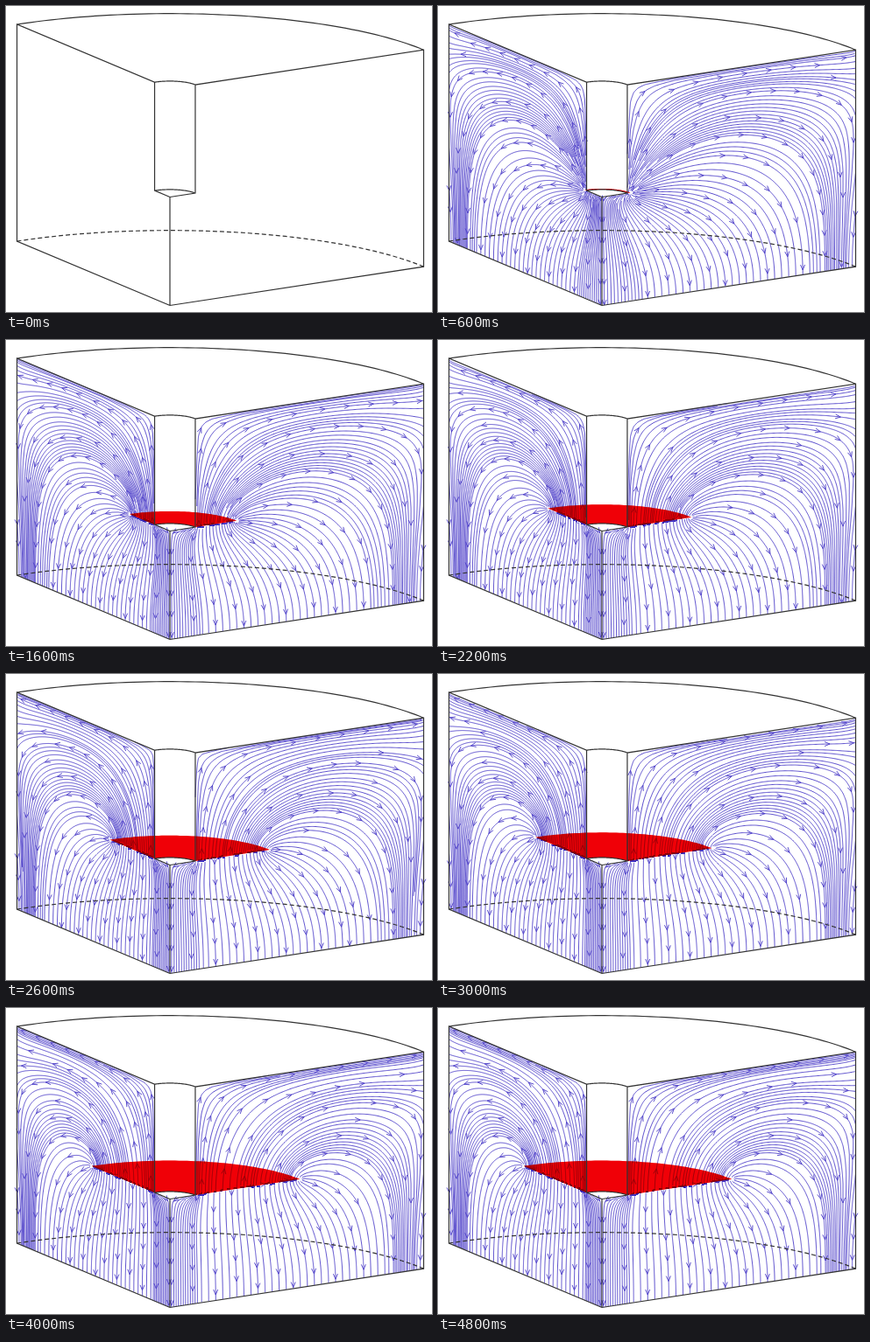
These frames come from a looping animation (486x350 px, 5000 ms). An HTML page with a canvas:

```html
<!DOCTYPE html>
<html lang="en">
<head>
<meta charset="utf-8">
<title>Flow around a growing crack</title>
<style>
  html, body { margin: 0; width: 100%; height: 100%; overflow: hidden; background: #fff; }
  canvas { display: block; }
</style>
</head>
<body>
<canvas id="stage" width="486" height="350"></canvas>
<script>
const ctx = document.getElementById('stage').getContext('2d');
const LOOP = 5000, STEP = 200;

// Oblique view of a quarter cylinder with radius 1 and height 1.
const ORIGIN = [187, 342.5], HEIGHT = 248;
const LEFT = [-174.5, -73.5], RIGHT = [289.5, -44.3];
const HOLE = 0.1, FLOOR = 0.5;
const project = (a, b, z) => [
  ORIGIN[0] + a * LEFT[0] + b * RIGHT[0],
  ORIGIN[1] + a * LEFT[1] + b * RIGHT[1] - z * HEIGHT
];
const onLeft = (r, z) => project(r, 0, z);
const onRight = (r, z) => project(0, r, z);

function arc(r, z) {
  const pts = [];
  for (let k = 0; k <= 60; k++) {
    const q = k / 60 * Math.PI / 2;
    pts.push(project(r * Math.cos(q), r * Math.sin(q), z));
  }
  return pts;
}

function trail(path, pts) {
  pts.forEach((p, k) => k ? path.lineTo(...p) : path.moveTo(...p));
}

// Axisymmetric potential on a grid: 1 on the crack, 0 at the base.
const N = 80, S = N + 1, H = N * HOLE, Z = N * FLOOR;
const at = (i, j) => (i + 1) * S + j;
const open = (i, j) => i >= 0 && j >= 0 && i < N && j < N && !(i < H && j >= Z) ? 1 : 0;
const linkR = new Float64Array((N + 3) * S), linkZ = new Float64Array((N + 3) * S);
for (let i = 0; i <= N; i++) for (let j = 0; j <= N; j++) {
  linkR[at(i, j)] = (open(i, j - 1) + open(i, j)) / 2 * (i + 0.5);
  linkZ[at(i, j)] = (open(i - 1, j) * (i - 0.25) + open(i, j) * (i + 0.25)) / 2;
}

function solve(tip) {
  const p = new Float64Array((N + 3) * S);
  for (let i = H; i <= tip; i++) p[at(i, Z)] = 1;
  for (let n = 0; n < 450; n++) {
    for (let i = 0; i <= N; i++) for (let j = 1; j <= N; j++) {
      if (j === Z && i >= H && i <= tip) continue;
      const k = at(i, j);
      const a = linkR[k - S], b = linkR[k], c = linkZ[k - 1], d = linkZ[k];
      const sum = a + b + c + d;
      if (!sum) continue;
      const leak = i === N ? j / N - 0.6 : 0;
      const mean = (a * p[k - S] + b * p[k + S] + c * p[k - 1] + d * p[k + 1]) / (sum + leak);
      p[k] += 1.95 * (mean - p[k]);
    }
  }
  return p;
}

function direction(p, r, z) {
  const i = Math.floor(r * N), j = Math.floor(z * N);
  if (!open(i, j)) return null;
  const x = r * N - i, y = z * N - j, k = at(i, j);
  const p00 = p[k], p01 = p[k + 1], p10 = p[k + S], p11 = p[k + S + 1];
  let u = (p00 - p10) * (1 - y) + (p01 - p11) * y;
  const w = (p00 - p01) * (1 - x) + (p10 - p11) * x;
  if (i === 0) u *= 2 * x;
  const len = Math.hypot(u, w);
  return len > 1e-10 ? [u / len, w / len] : null;
}

// Evenly spread streamlines: seeds in empty coarse cells, stops in taken fine cells.
const COARSE = 36, FINE = 200, DS = 0.004;
const cell = (r, z, n) => Math.floor(r * n) * n + Math.floor(z * n);

function streamlines(tip) {
  const p = solve(tip), edge = tip / N, lines = [];
  const taken = new Uint16Array(FINE * FINE), seen = new Uint8Array(COARSE * COARSE);
  let id = 0;

  function trace(r, z, sign) {
    const pts = [];
    for (let n = 0; n < 700; n++) {
      const v = direction(p, r, z);
      if (!v) break;
      const m = direction(p, r + sign * v[0] * DS / 2, z + sign * v[1] * DS / 2) || v;
      const r2 = r + sign * m[0] * DS, z2 = z + sign * m[1] * DS;
      if (!open(Math.floor(r2 * N), Math.floor(z2 * N))) break;
      if ((z - FLOOR) * (z2 - FLOOR) <= 0 && r2 >= HOLE && r2 <= edge) break;
      if (sign < 0 && Math.hypot(r2 - edge, z2 - FLOOR) < 0.008) break;
      const c = cell(r2, z2, FINE);
      if (taken[c] && taken[c] !== id) break;
      taken[c] = id;
      seen[cell(r2, z2, COARSE)] = 1;
      r = r2;
      z = z2;
      pts.push([r, z]);
    }
    return pts;
  }

  function seed(r, z) {
    const c = cell(r, z, FINE);
    if (taken[c] || !open(Math.floor(r * N), Math.floor(z * N))) return;
    taken[c] = ++id;
    const line = [...trace(r, z, -1).reverse(), [r, z], ...trace(r, z, 1)];
    if (line.length > 9) lines.push(line);
  }

  for (let k = 0; k < 12; k++) seed(0.006 + 0.009 * k, 0.3);
  for (let k = 0; k < 11; k++) seed(0.85 + 0.01 * k, 0.4);
  for (let j = 0; j < COARSE; j++) for (let i = 0; i < COARSE; i++) {
    if (!seen[i * COARSE + j]) seed((i + 0.5) / COARSE, (j + 0.5) / COARSE);
  }
  return lines;
}

function arrow(path, from, to) {
  const len = Math.hypot(to[0] - from[0], to[1] - from[1]) || 1;
  const dx = (to[0] - from[0]) / len, dy = (to[1] - from[1]) / len;
  const barb = s => [to[0] - 6 * dx - s * dy, to[1] - 6 * dy + s * dx];
  trail(path, [barb(2.5), to, barb(-2.5)]);
}

const cache = {};
function flow(tip) {
  if (cache[tip]) return cache[tip];
  const path = new Path2D(), heads = [];
  for (const line of streamlines(tip)) {
    for (const face of [onLeft, onRight]) trail(path, line.map(q => face(...q)));
    for (let k = 6; k < line.length; k += 4) {
      const [r, z] = line[k];
      if (heads.some(h => Math.hypot(h[0] - r, h[1] - z) < 0.09)) continue;
      heads.push([r, z]);
      for (const face of [onLeft, onRight]) arrow(path, face(...line[k - 2]), face(r, z));
    }
  }
  return cache[tip] = path;
}

// Crack radius over time (ms).
const GROWTH = [[200, 0.1], [400, 0.104], [600, 0.112], [1600, 0.263],
  [2200, 0.353], [3000, 0.433], [4000, 0.512], [5000, 0.512]];
function radius(t) {
  const k = GROWTH.findIndex(g => g[0] > t);
  const [t0, r0] = GROWTH[k - 1], [t1, r1] = GROWTH[k];
  return r0 + (r1 - r0) * (t - t0) / (t1 - t0);
}

const solid = new Path2D(), dashed = new Path2D();
for (const face of [onLeft, onRight]) {
  trail(solid, [face(0, FLOOR), face(HOLE, FLOOR), face(HOLE, 1), face(1, 1), face(1, 0), face(0, 0)]);
}
trail(solid, [onLeft(0, 0), onLeft(0, FLOOR)]);
trail(solid, arc(1, 1));
trail(solid, arc(HOLE, 1));
trail(solid, arc(HOLE, FLOOR));
trail(dashed, arc(1, 0));

function drawCrack(r) {
  const disk = new Path2D();
  trail(disk, [...arc(r, FLOOR), ...arc(HOLE, FLOOR).reverse()]);
  ctx.fillStyle = '#f00008';
  ctx.globalCompositeOperation = 'multiply';
  ctx.fill(disk);
  ctx.globalCompositeOperation = 'source-over';
  ctx.globalAlpha = 0.45;
  ctx.fill(disk);
  ctx.globalAlpha = 1;
}

function draw(t) {
  ctx.fillStyle = '#fff';
  ctx.fillRect(0, 0, 486, 350);
  if (t >= STEP) {
    const r = radius(t);
    ctx.strokeStyle = '#4a3cc8';
    ctx.lineWidth = 0.9;
    ctx.stroke(flow(Math.round(r * N)));
    drawCrack(r);
  }
  ctx.strokeStyle = '#333';
  ctx.lineWidth = 1.2;
  ctx.stroke(solid);
  ctx.setLineDash([5, 3]);
  ctx.stroke(dashed);
  ctx.setLineDash([]);
}

let start, shown = -1;
function tick(now) {
  start ??= now;
  const t = Math.floor((now - start) % LOOP / STEP) * STEP;
  if (t !== shown) draw(shown = t);
  requestAnimationFrame(tick);
}
draw(0);
requestAnimationFrame(tick);
</script>
</body>
</html>
```
